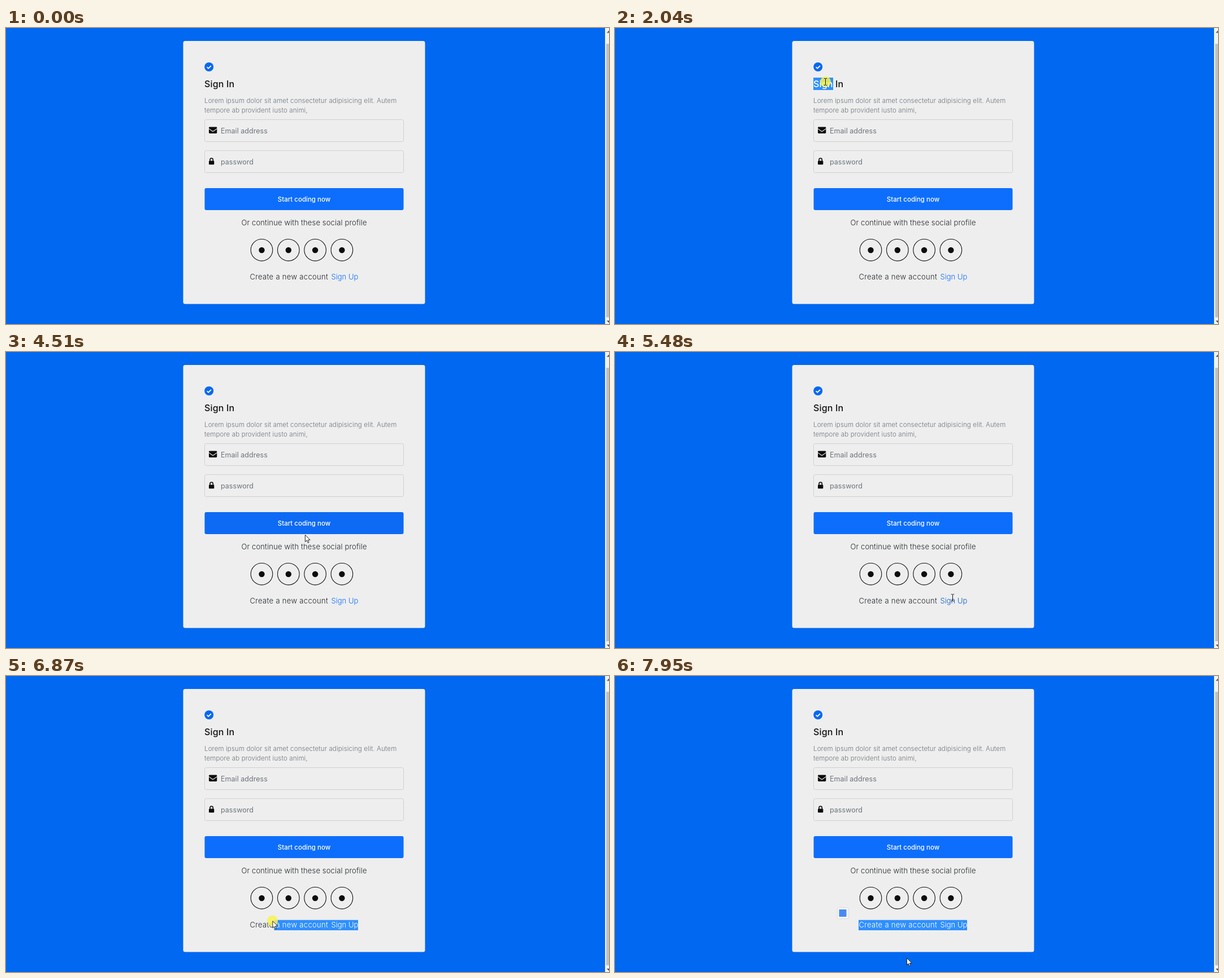
These frames come from a looping animation (1067x525 px, 8 s). An HTML page:

```html
<!DOCTYPE html>
<html lang="en">
<head>
<meta charset="utf-8">
<title>Sign In</title>
<style>
  html, body { margin: 0; width: 100%; height: 100%; overflow: hidden; background: #0068f1; }
  svg { display: block; width: 100%; height: 100%; font-family: Inter, "Open Sans", sans-serif; }
  .title { font-size: 16px; font-weight: 500; letter-spacing: .15px; fill: var(--ink, #111); }
  .intro { font-size: 11.5px; font-weight: 300; letter-spacing: .14px; fill: #6c757d; }
  .hint { font-size: 12.5px; letter-spacing: .04px; fill: #6c757d; }
  .action { font-size: 11.5px; font-weight: 500; fill: #fff; text-anchor: middle; }
  .body { font-size: 13px; font-weight: 300; fill: var(--ink, #212529); }
  .or { letter-spacing: .15px; text-anchor: middle; }
  .create { letter-spacing: .32px; }
  .link { fill: var(--ink, #0d6efd); }
  .link.hover { fill: var(--ink, #0a58ca); }
  .field { fill: none; stroke: #ced0d3; }
  .ring { fill: none; stroke: #111; stroke-width: 1.1; }
  .dark { fill: #0c0c0c; }
  .selected { --ink: #fff; }
  .selected rect { fill: #2f8fff; }
</style>
</head>
<body>
<svg viewBox="0 0 1067 525">
  <defs>
    <clipPath id="titleClip"><rect id="titleRange" x="351" y="88" height="22"/></clipPath>
    <clipPath id="lineClip"><rect id="lineRange" y="432.5" width="192" height="18.5"/></clipPath>
    <g id="translate">
      <rect x=".5" y=".5" width="19.5" height="19.5" rx="2" fill="#f8f8f8" stroke="#dcdcdc"/>
      <rect x="3.5" y="3.5" width="13" height="13" fill="#4a8af4"/>
    </g>
  </defs>

  <rect width="1067" height="525" fill="#0068f1"/>
  <rect x="313.5" y="23" width="428" height="466.5" rx="3.5" fill="#eee"/>

  <rect x="1060" width="7" height="525" fill="#f1f1f1"/>
  <rect x="1062" y="28" width="5" height="485" fill="#c1c1c1"/>
  <path d="M1063 8.5L1067 4.5V8.5ZM1063 519H1067V523Z" fill="#505050"/>

  <circle cx="359.2" cy="69" r="8" fill="#0068f1"/>
  <path d="M355.6 69.2L358.2 71.7L362.9 67" fill="none" stroke="#eee" stroke-width="2"/>

  <text id="title" class="title selectable" x="351" y="104.5">Sign In</text>
  <text class="intro selectable" x="351" y="133">Lorem ipsum dolor sit amet consectetur adipisicing elit. Autem</text>
  <text class="intro selectable" x="351" y="150">tempore ab provident iusto animi,</text>

  <rect class="field selectable" x="351.5" y="162.5" width="352" height="39" rx="3"/>
  <rect class="field selectable" x="351.5" y="217.5" width="352" height="39" rx="3"/>
  <rect class="dark" x="359" y="175.5" width="14.3" height="11.5" rx="1.4"/>
  <path d="M358.8 178.4L364.7 182.7Q366.1 183.6 367.5 182.7L373.5 178.4" fill="none" stroke="#eee" stroke-width="1.1"/>
  <rect class="dark" x="359" y="235.4" width="9.3" height="6.8" rx="1"/>
  <path d="M361 236V233.6A2.65 2.65 0 0 1 366.3 233.6V236" fill="none" stroke="#0c0c0c" stroke-width="1.6"/>
  <text class="hint" x="380" y="187">Email address</text>
  <text class="hint" x="380" y="242">password</text>

  <rect id="button" x="351.5" y="284" width="352" height="39" rx="3"/>
  <text class="action" x="527.5" y="307.8">Start coding now</text>
  <text class="body or" x="527.5" y="349.6">Or continue with these social profile</text>
  <g id="social"></g>

  <g id="line">
    <text class="body create selectable" x="431.5" y="446">Create a new account</text>
    <text id="link" class="body link selectable" x="575.5" y="446">Sign Up</text>
  </g>

  <g id="titleSel" class="selected" clip-path="url(#titleClip)">
    <rect x="351" y="88" width="53.5" height="22"/>
    <use href="#title"/>
  </g>
  <g id="lineSel" class="selected" clip-path="url(#lineClip)">
    <rect x="431" y="432.5" width="192" height="18.5"/>
    <use href="#line"/>
  </g>
  <use id="topIcon" href="#translate" x="362" y="66"/>
  <use id="lowIcon" href="#translate" x="393" y="410.5"/>

  <g id="cursor">
    <circle id="press" r="9.5" fill="#f8f253" opacity=".85"/>
    <path id="arrow" d="M.4 .4V12.6L3.2 10L5.2 14.5L7.1 13.7L5.2 9.3H9.2Z" fill="#fff" stroke="#111" stroke-width=".9" stroke-linejoin="round"/>
    <path id="beam" d="M-2.7 -6H-.7L0 -5.4L.7 -6H2.7M0 -5.4V5.4M-2.7 6H-.7L0 5.4L.7 6H2.7" fill="none" stroke="#111"/>
  </g>
</svg>
<script>
  const LOOP = 8000, STEP = 78;
  const $ = id => document.getElementById(id);
  const show = (id, on) => $(id).style.display = on ? '' : 'none';
  const within = (t, from, to) => t >= from && t < to;
  const easeOut = p => 1 - (1 - p) ** 3.5;

  // Key points of the pointer: start, end, x, y
  const ENTRY = [1580, 910];
  const MOVES = [
    [370, 670, 600, 181.5],
    [1000, 1000, 408.5, 124.5],
    [1070, 1310, 354, 94],
    [1480, 1650, 372.5, 95.5],
    [2730, 2900, 466, 101],
    [3820, 4210, 425, 191.5],
    [4440, 4510, 529, 324],
    [4590, 4670, 531, 331],
    [4820, 4910, 604.5, 418],
    [5290, 5860, 595.8, 440],
    [6090, 6480, 626.5, 441.5],
    [6780, 7260, 402.5, 431],
    [7560, 7950, 516, 500]
  ];

  function pointerAt(t) {
    let [x, y] = ENTRY;
    for (const [from, to, endX, endY] of MOVES) {
      if (t < from) break;
      const gaps = Math.round((to - from) / STEP);
      const done = gaps ? Math.floor((t - from) / (to - from) * gaps + 1e-6) : 0;
      const p = easeOut(Math.min(1, (done + 1) / (gaps + 1)));
      x += (endX - x) * p;
      y += (endY - y) * p;
    }
    return [x, y];
  }

  function hovers(el, x, y) {
    const b = el.getBBox();
    return within(x, b.x, b.x + b.width) && within(y, b.y, b.y + b.height);
  }

  const selectable = [...document.querySelectorAll('.selectable')];

  for (let i = 0; i < 4; i++) {
    const x = 452.5 + i * 47.3;
    $('social').innerHTML += `<circle class="ring" cx="${x}" cy="393.8" r="19.3"/><circle class="dark" cx="${x}" cy="394" r="5.2"/>`;
  }

  function draw(t) {
    const [x, y] = pointerAt(t);
    const dragging = within(t, 6630, 7410);
    const beam = !dragging && selectable.some(el => hovers(el, x, y));

    $('cursor').setAttribute('transform', `translate(${x} ${y})`);
    show('cursor', t >= 370);
    show('beam', beam);
    show('arrow', !beam);
    show('press', dragging || within(t, 1800, 2350) || within(t, 3060, 3270));

    // First the word, then the whole heading
    show('titleSel', within(t, 1970, 3270));
    $('titleRange').setAttribute('width', t < 2120 ? 35 : 53.5);
    show('topIcon', within(t, 2120, 3060));

    // The line is selected backwards from its end
    show('lineSel', t >= 6780);
    $('lineRange').setAttribute('x', t < 7260 ? Math.max(431, x + 3) : 431);
    show('lowIcon', t >= 7410);

    $('link').classList.toggle('hover', !dragging && hovers($('link'), x, y));
    const fade = within(t, 4440, 4590) ? (4590 - t) / 150 : 0;
    $('button').setAttribute('fill', `rgb(13 ${110 - 8 * fade} ${253 - 18 * fade})`);
  }

  function tick() {
    draw(performance.now() % LOOP);
    requestAnimationFrame(tick);
  }
  tick();
</script>
</body>
</html>
```
